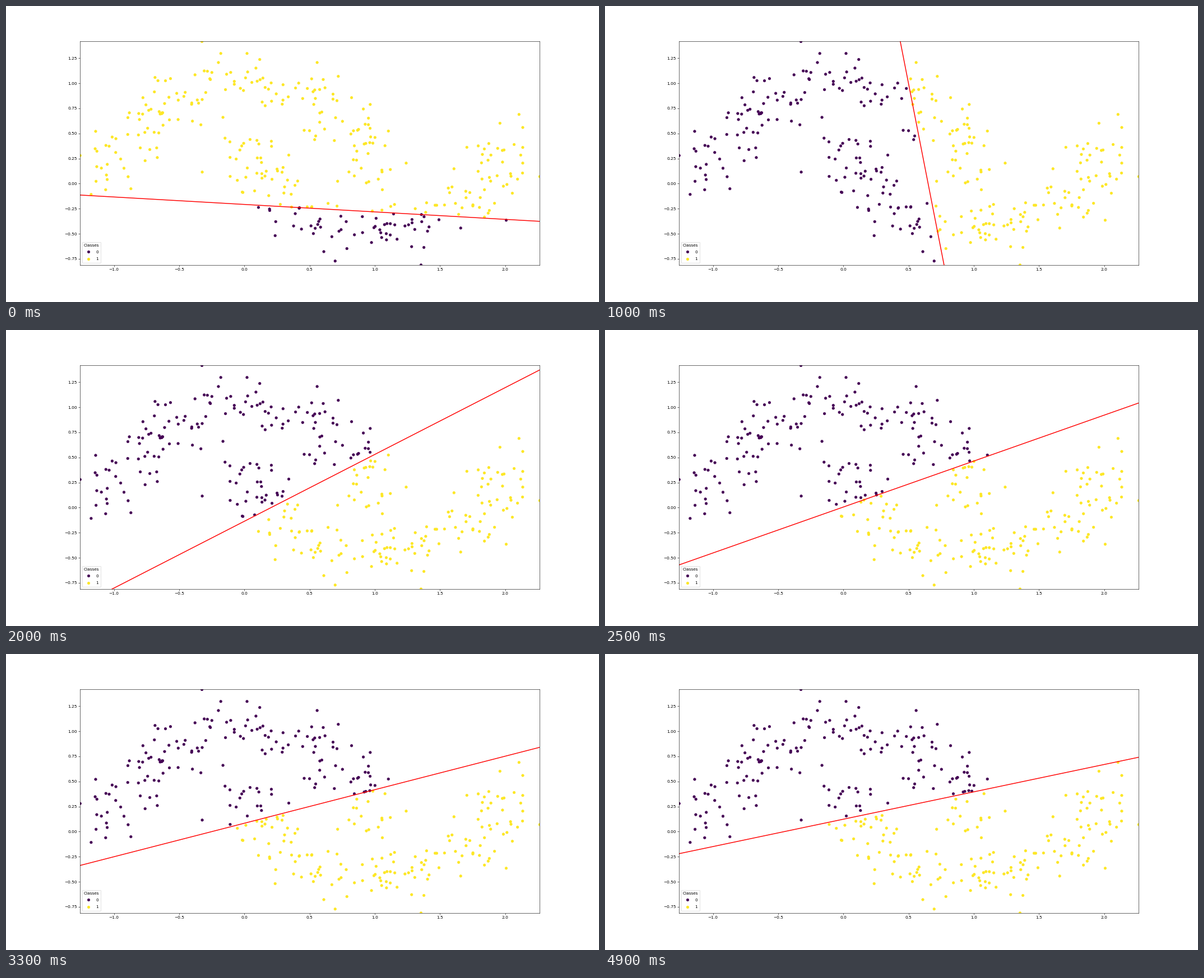
A matplotlib script that plays this animation: 1058 px wide and 529 px high, repeating every 5 s.

```python
import numpy as np
import matplotlib.pyplot as plt
from matplotlib.animation import FuncAnimation

FRAMES = 50
XLIM, YLIM = np.array([-1.259, 2.265]), np.array([-0.811, 1.416])

plt.rcParams.update({"font.family": "DejaVu Sans", "font.size": 10})

# Step, angle of the boundary's normal in degrees, offset along it.
KEYS = np.array([
    (0, 85.75, 0.2069), (6, 44.96, -0.612), (14, -26.06, -0.4405),
    (18, -49.16, -0.1956), (25, -65.4, 0.0052), (33, -71.53, 0.0792),
    (41, -73.82, 0.108), (49, -74.75, 0.1192),
])


def make_moons(n, noise, seed):
    """Two interleaving noisy half circles, plus the outermost samples."""
    rng = np.random.default_rng(seed)
    a = np.linspace(0, np.pi, n // 2)
    upper = np.column_stack([np.cos(a), np.sin(a)])
    lower = np.column_stack([1 - np.cos(a), 0.5 - np.sin(a)])
    pts = np.vstack([upper, lower])
    pts += rng.normal(0, noise, pts.shape)
    low, high = np.column_stack([XLIM, YLIM]) + [[0.03], [-0.03]]
    pts = pts[np.all((pts > low) & (pts < high), axis=1)]
    edge = [(XLIM[0], 0.28), (XLIM[1], 0.07), (-0.325, YLIM[1]), (1.355, YLIM[0])]
    return np.vstack([edge, pts])


def boundary(step):
    """Cubic Hermite interpolation of the key poses."""
    t, pose = KEYS[:, 0], KEYS[:, 1:]
    slope = np.gradient(pose, t, axis=0, edge_order=2)
    k = min(np.searchsorted(t, step, side="right") - 1, len(t) - 2)
    h = t[k + 1] - t[k]
    s = (step - t[k]) / h
    angle, offset = (
        (1 + 2 * s) * (1 - s) ** 2 * pose[k]
        + s * (1 - s) ** 2 * h * slope[k]
        + s * s * (3 - 2 * s) * pose[k + 1]
        + s * s * (s - 1) * h * slope[k + 1]
    )
    return np.cos(np.radians(angle)), np.sin(np.radians(angle)), offset


def predict(step):
    """Class of every sample and the boundary's height at both x limits."""
    wx, wy, bias = boundary(step)
    labels = (wx * x + wy * y + bias > 0).astype(float)
    return labels, -(wx * XLIM + bias) / wy


x, y = make_moons(336, 0.14, seed=3).T

fig = plt.figure(figsize=(20, 10), dpi=52.9, facecolor="white")
ax = fig.add_subplot()
fig.subplots_adjust(left=0.125, right=0.9, bottom=0.125, top=0.88)

labels, line_y = predict(0)
dots = ax.scatter(x, y, c=labels, cmap="viridis", vmin=0, vmax=1)
line, = ax.plot(XLIM, line_y, color="red", linewidth=2)
ax.set(xlim=XLIM, ylim=YLIM)
ax.legend(*dots.legend_elements(), loc="lower left", title="Classes")


def update(step):
    labels, line_y = predict(step)
    dots.set_array(labels)
    line.set_ydata(line_y)
    return dots, line


anim = FuncAnimation(fig, update, frames=FRAMES, interval=100,
                     repeat=True, repeat_delay=0)
plt.show()
```
